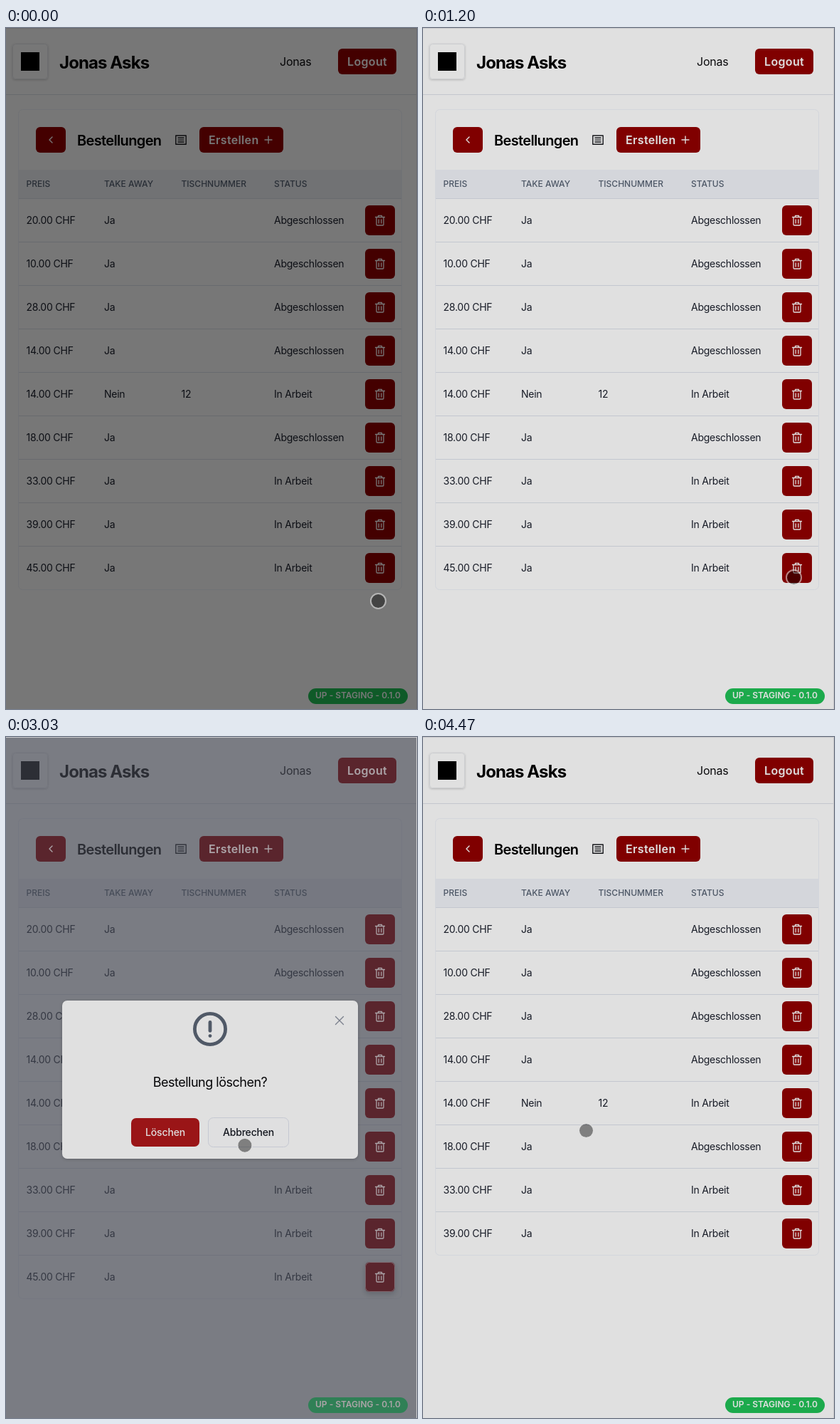
An HTML page with a canvas for the animation above (4510 ms loop, 578x956 px).

```html
<!DOCTYPE html>
<html lang="de">
<head>
<meta charset="utf-8">
<title>Bestellungen</title>
<style>
html, body { margin: 0; width: 100%; height: 100%; overflow: hidden; background: #e0e0e0; }
canvas { display: block; }
</style>
</head>
<body>
<canvas id="stage" width="578" height="956"></canvas>
<script>
const W = 578, H = 956, LOOP = 4510;
const ctx = document.getElementById('stage').getContext('2d');

const PAPER = [224, 224, 224], RED = [128, 0, 0], GREEN = [28, 170, 76];
const MUTED_RED = [90, 37, 45], MUTED_GREEN = [48, 128, 86], MUTED_PAPER = [172, 164, 168];

const DONE = 'Abgeschlossen', BUSY = 'In Arbeit';
const ORDERS = [
  [20, 'Ja', '', DONE], [10, 'Ja', '', DONE], [28, 'Ja', '', DONE],
  [14, 'Ja', '', DONE], [14, 'Nein', '12', BUSY], [18, 'Ja', '', DONE],
  [33, 'Ja', '', BUSY], [39, 'Ja', '', BUSY], [45, 'Ja', '', BUSY],
];
const COLUMNS = [28.5, 138, 246.5, 377];

// time, x, y
const POINTER = [
  [0, 523.5, 804.5], [170, 518.5, 797.5], [500, 517.5, 786.5], [1200, 521.5, 771.5],
  [1800, 524.5, 763], [2540, 524.5, 763], [2700, 500, 730], [2870, 430, 645],
  [3030, 336.5, 573.5], [3200, 222, 553.5], [3380, 229.5, 552.5], [LOOP, 229.5, 552.5],
];
const CLICKS = [2120, 3700];
const OPEN_AT = 2330, CLOSE_AT = 3900, FADE = 150, REMOVE_AT = 4030;

const clamp = v => Math.max(0, Math.min(1, v));
const ramp = (t, start, length) => clamp((t - start) / length);
const mix = (a, b, k) => `rgb(${a.map((v, i) => Math.round(v + (b[i] - v) * k))})`;

function box(x, y, w, h, r, fill, stroke, width = 1) {
  ctx.beginPath();
  ctx.roundRect(x, y, w, h, r);
  if (fill) { ctx.fillStyle = fill; ctx.fill(); }
  if (stroke) { ctx.strokeStyle = stroke; ctx.lineWidth = width; ctx.stroke(); }
}

function disc(x, y, r, fill) {
  ctx.beginPath();
  ctx.arc(x, y, r, 0, Math.PI * 2);
  ctx.fillStyle = fill;
  ctx.fill();
}

function ring(x, y, r, color, width) {
  ctx.beginPath();
  ctx.arc(x, y, r, 0, Math.PI * 2);
  ctx.strokeStyle = color;
  ctx.lineWidth = width;
  ctx.stroke();
}

function path(d, color, width, x = 0, y = 0) {
  ctx.save();
  ctx.translate(x, y);
  ctx.strokeStyle = color;
  ctx.lineWidth = width;
  ctx.lineCap = ctx.lineJoin = 'round';
  ctx.stroke(new Path2D(d));
  ctx.restore();
}

// y is the middle of the capital letters
function text(str, x, y, size, color, { weight = 400, spacing = 0, align = 'left' } = {}) {
  ctx.font = `${weight} ${size}px Inter, sans-serif`;
  ctx.letterSpacing = spacing + 'px';
  ctx.textAlign = align;
  ctx.fillStyle = color;
  ctx.fillText(str, x, y + size * 0.364);
}

function rule(y, x0, x1, color) {
  ctx.fillStyle = color;
  ctx.fillRect(x0, y, x1 - x0, 1);
}

function shadow(color, blur, y) {
  ctx.shadowColor = color;
  ctx.shadowBlur = blur;
  ctx.shadowOffsetY = y;
}
const noShadow = () => shadow('transparent', 0, 0);

function drawPage(rows) {
  ctx.fillStyle = '#e0e0e0';
  ctx.fillRect(0, 0, W, H);

  shadow('rgba(0,0,0,.2)', 3, 1);
  box(9, 22, 50, 50, 4, '#e0e0e0');
  noShadow();
  box(9.5, 22.5, 49, 49, 4, null, '#cccdd0');
  ctx.fillStyle = '#000';
  ctx.fillRect(21, 34, 26, 26);

  text('Jonas Asks', 75, 48, 24, '#000', { weight: 700, spacing: -0.9 });
  text('Jonas', 385, 47.5, 16, '#0b0b0d', { spacing: -0.2 });
  rule(93, 0, W, '#c4c7cd');

  const bottom = 239 + rows.length * 61;
  box(17.5, 114.5, 539, bottom - 114, 6, null, '#d3d6dc');
  text('Bestellungen', 100, 157.5, 20, '#000', { weight: 600, spacing: -0.65 });
  path('M.8 1H15.2V13.2H.8ZM4 4.2H12M4 7.1H12M4 10H12', '#15161a', 1.4, 238, 150);

  ctx.fillStyle = '#d4d6db';
  ctx.fillRect(18, 199, 538, 40);
  ['PREIS', 'TAKE AWAY', 'TISCHNUMMER', 'STATUS'].forEach((label, i) =>
    text(label, COLUMNS[i], 218.5, 12, '#4d5766', { weight: 450 }));

  rows.forEach(([price, ...rest], i) => {
    const y = 239 + i * 61;
    rule(y, 18, 556, '#c3c7cf');
    [price.toFixed(2) + ' CHF', ...rest].forEach((cell, c) =>
      text(cell, COLUMNS[c], y + 31, 14, '#181c27', { spacing: -0.25 }));
  });
}

function drawTrash(y, fill, ink, focus) {
  if (focus) shadow(`rgba(20,25,30,${0.2 * focus})`, 7, 3);
  box(505, y, 42, 42, 6, fill);
  noShadow();
  if (focus) box(505.5, y + 0.5, 41, 41, 6, null, `rgba(150,146,152,${0.6 * focus})`);
  path('M-6.5-4.5H6.5M-2.5-4.5V-6.7H2.5V-4.5M-5-4.5V5.8Q-5 7-3.8 7H3.8Q5 7 5 5.8V-4.5M-1.8-1.2V4M1.8-1.2V4',
    ink, 1.3, 526, y + 21);
}

function drawButtons(count, k) {
  const fill = mix(RED, MUTED_RED, k), ink = mix(PAPER, MUTED_PAPER, k);
  const label = { weight: 600, spacing: 0.35 };
  box(467, 29, 82, 36, 6, fill);
  text('Logout', 480, 47.5, 16, ink, label);
  box(42, 139, 42, 36, 6, fill);
  path('M2-4L-2 0L2 4', ink, 1.4, 63, 157);
  box(272, 139, 118, 36, 6, fill);
  text('Erstellen', 285, 157.5, 16, ink, label);
  path('M-5 0H5M0-5V5', ink, 1.4, 369, 157);
  for (let i = 0; i < count; i++) {
    drawTrash(249 + i * 61, fill, ink, i === ORDERS.length - 1 ? k : 0);
  }
}

function drawBadge(k) {
  box(425, 927, 140, 22, 11, mix(GREEN, MUTED_GREEN, k));
  text('UP - STAGING - 0.1.0', 495, 937, 12, mix(PAPER, MUTED_PAPER, k), { weight: 600, align: 'center' });
}

function drawModal(k) {
  ctx.save();
  ctx.globalAlpha = k;
  shadow('rgba(0,0,0,.2)', 4, 1);
  box(79, 370, 416, 222, 7, '#e0e0e0');
  noShadow();
  ring(287, 410, 21.6, '#505967', 4.8);
  path('M287 400.4V412.4', '#505967', 4.8);
  disc(287, 419.6, 2.4, '#505967');
  path('M-5.5-5.5L5.5 5.5M5.5-5.5L-5.5 5.5', '#7b818d', 1.4, 469, 398);
  text('Bestellung löschen?', 287, 484, 18, '#050507', { spacing: -0.5, align: 'center' });
  box(176, 535, 96, 40, 7, '#9a1517');
  text('Löschen', 224, 555, 14, '#e0dede', { weight: 500, spacing: -0.15, align: 'center' });
  box(284.5, 534.5, 113, 41, 7, '#dfdfe0', '#c5c8d2');
  text('Abbrechen', 341, 555, 14, '#14171f', { weight: 500, spacing: -0.2, align: 'center' });
  ctx.restore();
}

// Monotone cubic through the pointer's key positions
function pointerAt(t) {
  const n = POINTER.length;
  let i = 0;
  while (i < n - 2 && t >= POINTER[i + 1][0]) i++;
  const a = POINTER[i], b = POINTER[i + 1], span = b[0] - a[0], u = (t - a[0]) / span;
  const speed = (j, c) => (POINTER[j + 1][c] - POINTER[j][c]) / (POINTER[j + 1][0] - POINTER[j][0]);
  const tangent = (j, c) => {
    if (j === 0) return speed(0, c);
    if (j === n - 1) return 0;
    const p = speed(j - 1, c), q = speed(j, c);
    return p * q <= 0 ? 0 : 2 * p * q / (p + q);
  };
  return [1, 2].map(c =>
    a[c] + (b[c] - a[c]) * u * u * (3 - 2 * u) +
    span * u * (1 - u) * (tangent(i, c) * (1 - u) - tangent(i + 1, c) * u));
}

function drawPointer(t) {
  const [x, y] = pointerAt(t);
  disc(x, y, 9.6, 'rgba(0,0,0,.43)');
  ring(x, y, 10.5, 'rgba(224,224,224,.6)', 2);
  for (const start of CLICKS) {
    const p = (t - start) / 300;
    if (p < 0 || p > 1) continue;
    const r = 11 + 14 * (1 - (1 - p) ** 3);
    ctx.save();
    ctx.globalAlpha = clamp((1 - p) * 1.8);
    ring(x, y, r, '#e8e8e8', 5.5);
    ring(x, y, r + 0.8, '#000', 3);
    ctx.restore();
  }
}

function draw(t) {
  const rows = t < REMOVE_AT ? ORDERS : ORDERS.slice(0, -1);
  const k = ramp(t, OPEN_AT, FADE) * (1 - ramp(t, CLOSE_AT, FADE));
  const dark = Math.max(0, 0.47 - t * 0.00108);

  drawPage(rows);
  if (k) {
    ctx.fillStyle = `rgba(68,71,82,${0.65 * k})`;
    ctx.fillRect(0, 0, W, H);
  }
  drawButtons(rows.length, k);
  drawBadge(k);
  if (dark) {
    ctx.fillStyle = `rgba(0,0,0,${dark})`;
    ctx.fillRect(0, 0, W, H);
  }
  const edge = mix([202, 202, 205], [0, 0, 0], dark);
  rule(0, 0, W, edge);
  ctx.fillRect(W - 1, 0, 1, H);
  if (k) drawModal(k);
  drawPointer(t);
}

function tick() {
  draw(performance.now() % LOOP);
  requestAnimationFrame(tick);
}
tick();
</script>
</body>
</html>
```
